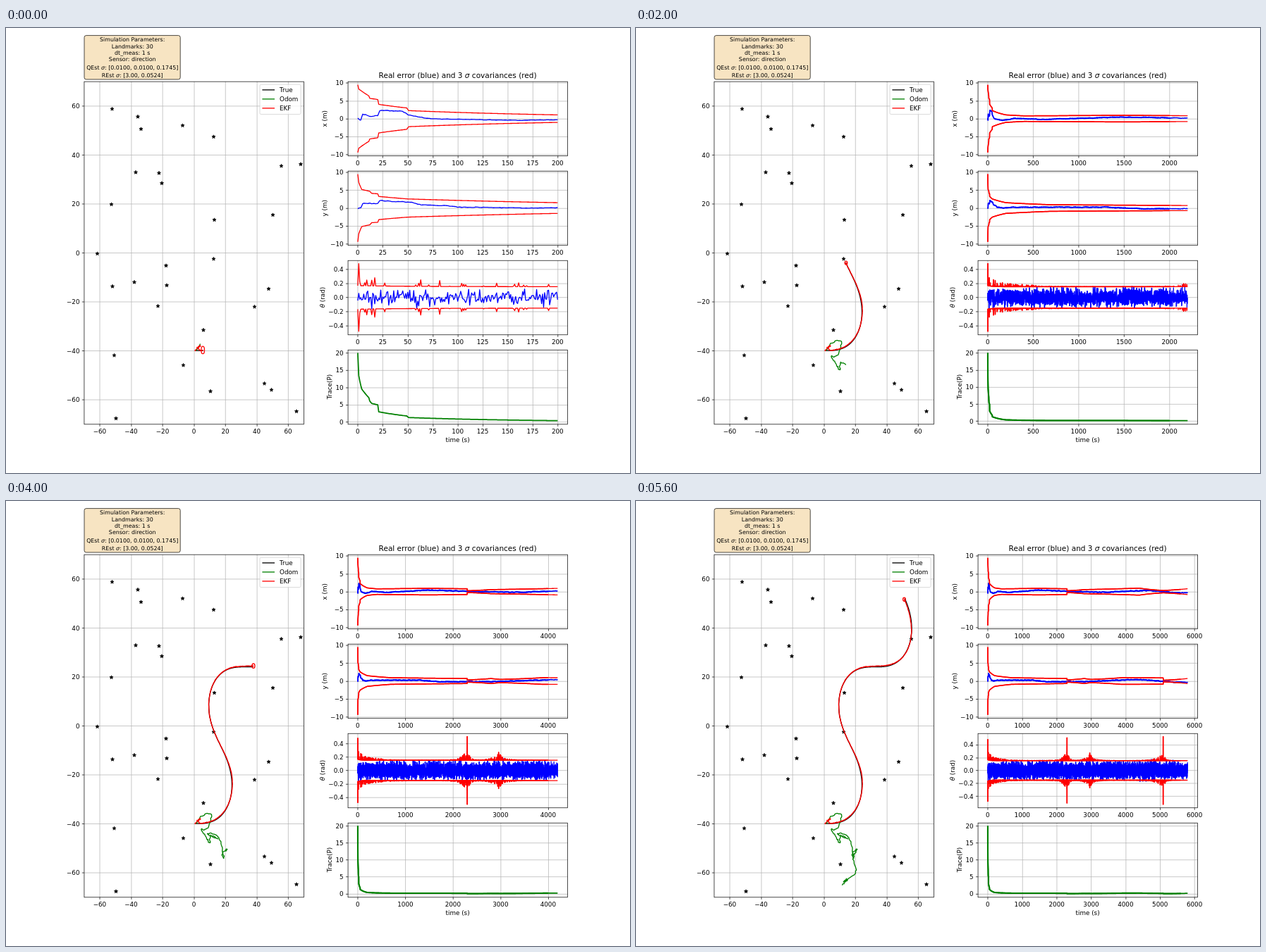
These frames come from a looping animation (885 px wide and 632 px high, 5.8 s). An HTML page with a canvas:

```html
<!DOCTYPE html>
<html lang="en">
<head>
<meta charset="utf-8">
<title>Filter simulation</title>
<style>
html, body { margin: 0; width: 100%; height: 100%; overflow: hidden; background: #fff; }
canvas { display: block; }
</style>
</head>
<body>
<canvas id="stage" width="885" height="632"></canvas>
<script>
const ctx = document.getElementById('stage').getContext('2d');
const STEP = 200, LOOP = 5800, N = LOOP + 1;
const UNIT = 0.632, PT = UNIT * 100 / 72; // figure pixel and point on the stage
const RED = '#f00', BLUE = '#00f', GREEN = '#008000', GRID = '#b0b0b0';
const MAP = { x: 110.62, y: 75.84, w: 311.77, h: 486.64 };
const ROW = [0, 1, 2, 3].map(i => ({ x: 484.73, y: 75.84 + i * 126.95, w: 311.77, h: 105.79 }));

// ---------- data ----------
function random(seed) {
  return () => {
    seed = (seed + 0x6D2B79F5) | 0;
    let r = Math.imul(seed ^ (seed >>> 15), 1 | seed);
    r = (r + Math.imul(r ^ (r >>> 7), 61 | r)) ^ r;
    return ((r ^ (r >>> 14)) >>> 0) / 4294967296;
  };
}

const series = f => Float64Array.from({ length: N }, (_, t) => f(t));
const linear = (a, b, k) => a + (b - a) * k;
const geometric = (a, b, k) => a * (b / a) ** k;
const decay = (d, s) => d < 0 ? 0 : Math.exp(-d / s);

// Keys are [time, value] pairs.
function track(keys, mix) {
  let i = 0;
  return series(t => {
    while (i + 2 < keys.length && keys[i + 1][0] <= t) i++;
    const [t0, a] = keys[i], [t1, b] = keys[i + 1];
    return mix(a, b, Math.min(1, (t - t0) / (t1 - t0)));
  });
}

// Smooth curve through evenly spaced values.
function spline(values) {
  const last = values.length - 1, at = i => values[Math.max(0, Math.min(last, i))];
  return series(t => {
    const u = t / LOOP * last, i = Math.floor(u), k = u - i;
    const [p, a, b, n] = [at(i - 1), at(i), at(i + 1), at(i + 2)];
    return a + k / 2 * (b - p + k * (2 * p - 5 * a + 4 * b - n + k * (3 * (a - b) + n - p)));
  });
}

function wobble(seed, period) {
  const rnd = random(seed);
  const knots = Array.from({ length: Math.ceil(N / period) + 2 }, () => rnd() * 2 - 1);
  return series(t => {
    const i = Math.floor(t / period);
    return linear(knots[i], knots[i + 1], t / period - i);
  });
}

const START = 3 * Math.sqrt(10);
const sigX = track([[0, START], [1, 8.3], [11, 6.4], [12, 5.7], [20, 5.35], [21, 4], [49, 3], [51, 2.25],
  [200, 1.05], [400, 0.78], [1500, 0.93], [2299, 0.8], [2300, 0.25], [2800, 0.57], [4400, 0.98],
  [5100, 0.33], [5800, 0.82]], geometric);
const sigY = track([[0, START], [1, 7.2], [4, 5.2], [12, 4.7], [14, 4.1], [20, 4], [21, 3.25], [50, 2.55],
  [200, 1.5], [700, 0.92], [2299, 0.7], [2301, 0.3], [2800, 0.7], [3000, 0.45], [3900, 0.94],
  [5090, 0.87], [5100, 0.22], [5800, 0.72]], geometric);

function error(keys, seed) {
  const fast = wobble(seed, 2), slow = wobble(seed + 1, 40);
  return track(keys, linear).map((v, t) => v + fast[t] * (0.06 + 0.12 * decay(t, 40)) + slow[t] * 0.08);
}
const errX = error([[0, 0], [3, -0.4], [5, 1.3], [12, 0.6], [20, 0.9], [22, 2.3], [45, 2.1], [51, 1],
  [73, 0], [165, -0.45], [300, 0.05], [600, -0.25], [1450, 0.45], [2300, 0.1], [3300, -0.2],
  [4700, 0.35], [5400, -0.3], [5800, -0.35]], 3);
const errY = error([[0, 0], [3, 0.1], [5, 1.3], [20, 1.3], [22, 2.2], [30, 1.9], [54, 1.6], [63, 0.9],
  [90, 0.7], [100, 0.25], [170, -0.05], [250, 0.2], [1300, 0.25], [1700, -0.2], [2800, -0.2],
  [4300, 0.45], [5400, -0.3], [5800, -0.4]], 8);

const noise = random(21);
const errT = series(() => (noise() + noise() + noise() + noise() - 2) * 0.1);

// Heading uncertainty: a flat floor with spikes that crowd around a few moments.
const bursts = [
  { at: 1, top: 0.48, amp: 0.13, rise: 1, fall: 260 },
  { at: 2300, top: 0.506, amp: 0.16, rise: 120, fall: 60 },
  { at: 2960, top: 0.27, amp: 0.11, rise: 130, fall: 130 },
  { at: 5090, top: 0.526, amp: 0.13, rise: 180, fall: 60 },
];
const spiky = random(14);
const sigT = series(t => {
  const hit = spiky() < 0.1 + 0.15 * decay(t, 80), r = spiky();
  const peak = bursts.find(b => b.at === t);
  if (peak) return peak.top;
  const amp = bursts.reduce((sum, b) =>
    sum + b.amp * (t < b.at ? decay(b.at - t, b.rise) : decay(t - b.at, b.fall)), 0);
  return 0.152 + 0.015 * decay(t, 60) + (hit ? amp * r : 0);
});
const trace = series(t => (sigX[t] ** 2 + sigY[t] ** 2 + sigT[t] ** 2) / 9);

// Constant speed, sinusoidal turn rate.
const trueX = new Float64Array(N), trueY = new Float64Array(N);
trueX[0] = 1;
trueY[0] = -40;
for (let t = 1, a = 0; t < N; t++) {
  trueX[t] = trueX[t - 1] + 0.025 * Math.cos(a);
  trueY[t] = trueY[t - 1] + 0.025 * Math.sin(a);
  a += 0.1 * Math.PI / 180 * Math.sin(3 * Math.PI * t / 6000);
}
const ekfX = trueX.map((v, t) => v + errX[t]);
const ekfY = trueY.map((v, t) => v + errY[t]);

// Drifting odometry, in stage pixels.
const drift = [[269, 458], [280, 446], [291, 446], [285, 465], [277, 467], [285, 479], [289, 485],
  [290, 475], [300, 480], [286, 473], [298, 474], [305, 487], [309, 507], [307, 500], [313, 495],
  [310, 501], [308, 509], [312, 526], [295, 541], [299, 537], [293, 545]];
const shakeX = wobble(31, 35), shakeY = wobble(32, 35);
const odomX = spline(drift.map(p => p[0])).map((v, t) => v + shakeX[t]);
const odomY = spline(drift.map(p => p[1])).map((v, t) => v + shakeY[t]);

// Landmarks, in stage pixels.
const stars = [[150.5, 115], [187, 126], [191.5, 143.5], [250.5, 138.5], [294.5, 154.5], [390.5, 196],
  [418, 193.5], [184, 205], [217, 206], [221, 220.5], [149.5, 250.5], [295.5, 272.5], [378.5, 265.5],
  [129.5, 320.5], [294.5, 328], [227, 337.5], [182, 361], [151, 367], [228, 365.5], [372.5, 370.5],
  [215.5, 395], [352.5, 396], [280, 429], [153.5, 465], [251.5, 479], [290, 516], [366.5, 505],
  [376.5, 514], [412, 544.5], [156, 554.5]];

// ---------- drawing ----------
function text(str, x, y, size = 10, align = 'center') {
  const runs = str.split(/([σθ])/).filter(Boolean);
  const font = run => {
    ctx.font = `${/[σθ]/.test(run) ? 'italic ' : ''}${size * PT}px "DejaVu Sans", sans-serif`;
  };
  const widths = runs.map(run => { font(run); return ctx.measureText(run).width; });
  const total = widths.reduce((a, b) => a + b, 0);
  x -= align === 'center' ? total / 2 : align === 'right' ? total : 0;
  ctx.fillStyle = '#000';
  runs.forEach((run, i) => { font(run); ctx.fillText(run, x, y); x += widths[i]; });
}

function upright(str, x, y) {
  ctx.save();
  ctx.translate(x, y);
  ctx.rotate(-Math.PI / 2);
  text(str, 0, 3);
  ctx.restore();
}

function segment(x0, y0, x1, y1, color, width) {
  ctx.strokeStyle = color;
  ctx.lineWidth = width;
  ctx.beginPath();
  ctx.moveTo(x0, y0);
  ctx.lineTo(x1, y1);
  ctx.stroke();
}

function trail(last, px, py, color, width = 1.5 * PT) {
  ctx.strokeStyle = color;
  ctx.lineWidth = width;
  ctx.beginPath();
  for (let t = 0; t <= last; t++) ctx.lineTo(px(t), py(t));
  ctx.stroke();
}

// The older part is plotted over itself and looks a little heavier.
function curve(now, px, py, color, width = 1.5 * PT) {
  trail(now, px, py, color, width);
  if (now > STEP) trail(now - STEP, px, py, color, width + 0.35);
}

const snap = v => (Math.round(v / UNIT) + 0.5) * UNIT;
const label = (v, digits) => (v < 0 ? '\u2212' : '') + Math.abs(v).toFixed(digits);

function ticks(lo, hi, step) {
  const out = [];
  for (let i = Math.ceil(lo / step); i * step <= hi; i++) out.push(i * step);
  return out;
}

function axes(box, xs, ys, px, py, digits, content) {
  const left = snap(box.x), right = snap(box.x + box.w), top = snap(box.y), bottom = snap(box.y + box.h);
  const w = 0.8 * PT, len = 3.5 * PT;
  xs.forEach(v => segment(snap(px(v)), top, snap(px(v)), bottom, GRID, w));
  ys.forEach(v => segment(left, snap(py(v)), right, snap(py(v)), GRID, w));
  ctx.save();
  ctx.beginPath();
  ctx.rect(box.x, box.y, box.w, box.h);
  ctx.clip();
  ctx.lineJoin = 'round';
  content();
  ctx.restore();
  for (const v of xs) {
    segment(snap(px(v)), bottom, snap(px(v)), bottom + len, '#000', w);
    text(label(v, 0), px(v), box.y + box.h + 13.1);
  }
  for (const v of ys) {
    segment(left - len, snap(py(v)), left, snap(py(v)), '#000', w);
    text(label(v, digits), box.x - 2 * len, py(v) + 3.4, 10, 'right');
  }
  ctx.strokeStyle = '#000';
  ctx.lineWidth = w;
  ctx.strokeRect(left, top, right - left, bottom - top);
}

function star([x, y]) {
  ctx.beginPath();
  for (let i = 0; i < 10; i++) {
    const r = 3 * PT * (i % 2 ? 0.381 : 1), a = i * Math.PI / 5;
    ctx.lineTo(x + r * Math.sin(a), y - r * Math.cos(a));
  }
  ctx.closePath();
  ctx.fillStyle = ctx.strokeStyle = '#000';
  ctx.lineWidth = PT;
  ctx.fill();
  ctx.stroke();
}

function roundBox(x, y, w, h, r, fill, edge) {
  ctx.beginPath();
  ctx.roundRect(x, y, w, h, r);
  ctx.fillStyle = fill;
  ctx.strokeStyle = edge;
  ctx.lineWidth = PT;
  ctx.fill();
  ctx.stroke();
}

function drawMap(now) {
  const px = v => MAP.x + (v + 70) * MAP.w / 140;
  const py = v => MAP.y + (70 - v) * MAP.h / 140;
  const marks = ticks(-70, 70, 20);
  axes(MAP, marks, marks, px, py, 0, () => {
    stars.forEach(star);
    trail(now, t => px(trueX[t]), t => py(trueY[t]), '#000');
    trail(now, t => odomX[t], t => odomY[t], GREEN);
    trail(now, t => px(ekfX[t]), t => py(ekfY[t]), RED);
    ctx.beginPath();
    ctx.ellipse(px(ekfX[now]), py(ekfY[now]), sigX[now] * MAP.w / 140, sigY[now] * MAP.h / 140, 0, 0, 7);
    ctx.stroke();
  });
  roundBox(360, 80.2, 58, 42.4, 1.8, 'rgba(255,255,255,.8)', 'rgba(204,204,204,.8)');
  [['True', '#000'], ['Odom', GREEN], ['EKF', RED]].forEach(([name, color], i) => {
    const y = 87.9 + i * 13;
    segment(363.4, y, 381, y, color, 1.5 * PT);
    text(name, 388, y + 3.2, 10, 'left');
  });
}

function drawInfo() {
  roundBox(111, 10.6, 136.2, 62.4, 2.8, 'rgba(245,222,179,.8)', 'rgba(0,0,0,.8)');
  text('Simulation Parameters:', 179.2, 19.2, 9);
  text('Landmarks: 30', 179.2, 28.7, 9);
  text('dt_meas: 1 s', 179.2, 38, 9);
  text('Sensor: direction', 179.2, 47.4, 9);
  text('QEst σ: [0.0100, 0.0100, 0.1745]', 179.2, 58.5, 9);
  text('REst σ: [3.00, 0.0524]', 179.2, 69.6, 9);
}

// Round step that leaves at most nine intervals.
function timeStep(now) {
  const raw = now * 1.1 / 9, p = 10 ** Math.floor(Math.log10(raw));
  return p * [1, 2, 2.5, 5, 10].find(s => s * p >= raw);
}

function drawRow(now, box, lo, hi, step, digits, content) {
  const pad = (hi - lo) * 0.05;
  lo -= pad;
  hi += pad;
  const px = t => box.x + box.w * (t / now + 0.05) / 1.1;
  const py = v => box.y + box.h * (hi - v) / (hi - lo);
  const xs = ticks(0, now * 1.05, timeStep(now));
  axes(box, xs, ticks(lo, hi, step), px, py, digits, () => content(px, py));
}

function drawError(now, box, err, sig, step, digits) {
  const max = Math.max(...sig.subarray(0, now + 1));
  drawRow(now, box, -max, max, step, digits, (px, py) => {
    curve(now, px, t => py(err[t]), BLUE);
    curve(now, px, t => py(sig[t]), RED);
    curve(now, px, t => py(-sig[t]), RED);
  });
}

function draw(now) {
  ctx.fillStyle = '#fff';
  ctx.fillRect(0, 0, 885, 632);
  drawInfo();
  drawMap(now);
  drawError(now, ROW[0], errX, sigX, 5, 0);
  drawError(now, ROW[1], errY, sigY, 5, 0);
  drawError(now, ROW[2], errT, sigT, 0.2, 1);
  const low = Math.min(...trace.subarray(0, now + 1));
  drawRow(now, ROW[3], low, trace[0], 5, 0, (px, py) => curve(now, px, t => py(trace[t]), GREEN, 2 * PT));
  text('Real error (blue) and 3 σ covariances (red)', 640.6, 70.6, 12);
  text('time (s)', 640.6, 588.2);
  upright('x (m)', 452.3, 128.7);
  upright('y (m)', 452.3, 255.7);
  upright('θ (rad)', 448.5, 382.6);
  upright('Trace(P)', 459, 509.6);
}

// ---------- clock ----------
const start = performance.now();
let shown = 0;
function tick() {
  const elapsed = Math.max(0, performance.now() - start) % LOOP;
  const now = STEP * (1 + Math.floor(elapsed / STEP));
  if (now !== shown) draw(shown = now);
  requestAnimationFrame(tick);
}
tick();
</script>
</body>
</html>
```
